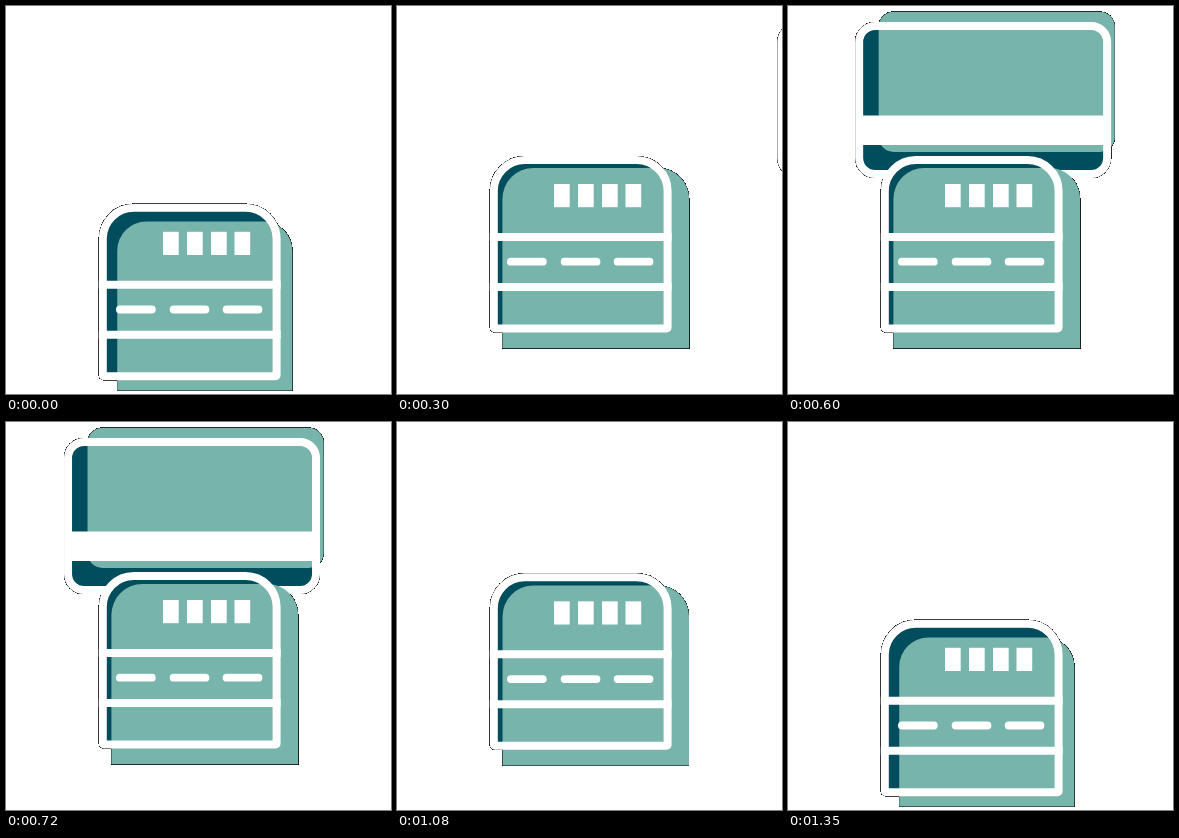
These frames come from a looping animation (385x388 px, 1.5 s). An HTML page with a canvas:

```html
<!DOCTYPE html>
<html lang="en">
<head>
<meta charset="utf-8">
<title>Card and terminal</title>
<style>
  html, body { margin: 0; width: 100%; height: 100%; overflow: hidden; background: #fff; }
  canvas { display: block; }
</style>
</head>
<body>
<canvas id="stage" width="385" height="388"></canvas>
<script>
const W = 385, H = 388, LOOP = 1500, STEP = 30;
const DARK = '#004d5d', TEAL = '#77b4ab', WHITE = '#fff';
const ctx = document.getElementById('stage').getContext('2d', { willReadFrequently: true });

function box(left, top, right, bottom, radius, color) {
  ctx.beginPath();
  ctx.roundRect(left, top, right - left, bottom - top, radius);
  ctx.fillStyle = color;
  ctx.fill();
}

function frame(left, top, right, bottom, radius) {
  ctx.beginPath();
  ctx.roundRect(left + 4, top + 4, right - left - 8, bottom - top - 8, radius);
  ctx.strokeStyle = WHITE;
  ctx.lineWidth = 8;
  ctx.stroke();
}

const smooth = p => p * p * (3 - 2 * p);
const progress = (t, start, end) => smooth(Math.min(1, Math.max(0, (t - start) / (end - start))));

// Fast in from the right, nearly still in the middle, fast out to the left.
function cardX(t) {
  const u = Math.abs(t - 668);
  return 61.3 - Math.sign(t - 668) * (0.00102 * u ** 2 + 3.63e-6 * u ** 3);
}

function drawCard(x) {
  ctx.save();
  ctx.translate(x, 0);
  box(4, 20, 252, 168, 16, DARK);
  box(23.5, 5.7, 259.6, 146, 15, TEAL);
  box(4, 109.5, 252, 139, 0, WHITE);
  frame(0, 16, 256, 172, 16);
  ctx.restore();
}

function drawTerminal(lowered) {
  ctx.save();
  ctx.translate(0, 47.8 * lowered);
  box(96, 154, 271, 323, [31, 31, 0, 0], DARK);

  ctx.save();
  const scale = 1 - 0.0625 * lowered;
  ctx.translate(198.8, 252.15);
  ctx.scale(scale, scale);
  box(-93.4, -90.15, 93.4, 90.15, [31, 31, 0, 0], TEAL);
  ctx.restore();

  frame(92.8, 150, 274.6, 326.4, [31, 31, 1, 1]);
  for (const y of [227, 277]) box(92.8, y, 274.6, y + 8, 0, WHITE);
  for (const x of [157, 181, 205, 228.5]) box(x, 178, x + 15.7, 201.2, 0, WHITE);
  for (const x of [110, 163.7, 216.7]) box(x, 251.8, x + 39.7, 259.6, 3.9, WHITE);
  ctx.restore();
}

// Blend the soft outer edge with black, which leaves a hairline outline.
function blackenEdges() {
  const image = ctx.getImageData(0, 0, W, H), d = image.data;
  for (let i = 0; i < d.length; i += 4) {
    const a = d[i + 3];
    if (a === 0 || a === 255) continue;
    for (let c = 0; c < 3; c++) d[i + c] *= a / 255;
    d[i + 3] = a < 12 ? 0 : 255;
  }
  ctx.putImageData(image, 0, 0);
}

function draw(t) {
  ctx.clearRect(0, 0, W, H);
  if (t > 240 && t < 1080) drawCard(cardX(t));
  drawTerminal(1 - progress(t, 0, 300) + progress(t, 1050, 1350));
  blackenEdges();
}

const start = performance.now();
function tick() {
  const t = (performance.now() - start) % LOOP;
  draw(Math.floor(t / STEP) * STEP);
  requestAnimationFrame(tick);
}
tick();
</script>
</body>
</html>
```
